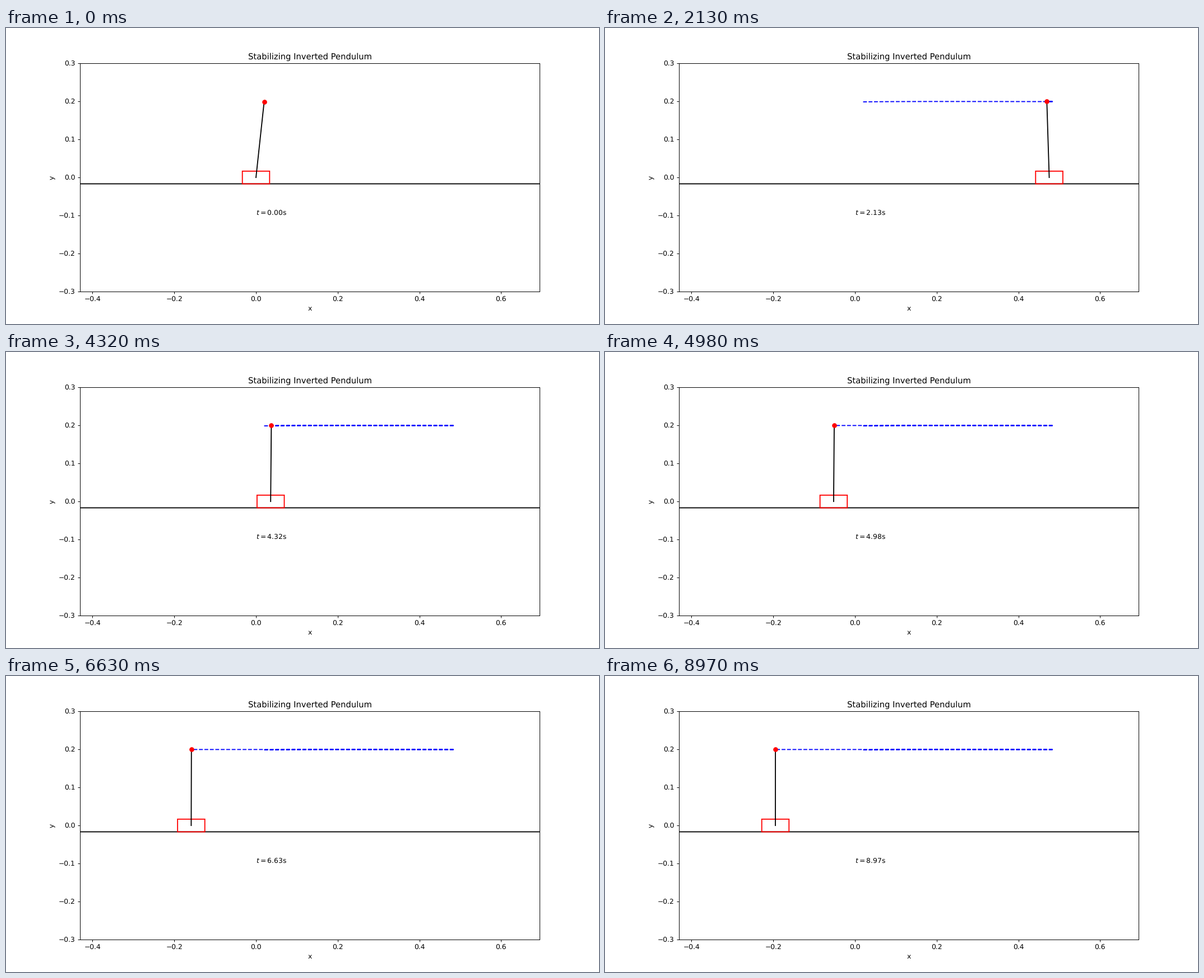
Animation, 1058 px wide and 529 px high, one loop 9 s. Source, as a matplotlib script:

```python
import math

import numpy as np
import matplotlib.pyplot as plt
from matplotlib.animation import FuncAnimation
from matplotlib.patches import Rectangle

G = 9.81
ROD = 0.2              # drawn rod length
ARM = 0.39             # effective length, inertia included
THETA0 = 0.1
GOAL = -0.203          # where the cart settles
GAINS = np.array([3.099, 9.551, 10.573, 5.33])
STEP = 0.03
FRAMES = 300
CART_W, CART_H = ROD / 3, ROD / 6


def simulate():
    """Cart position and rod angle at every step, starting from rest.

    The state is s - GOAL with s = x + ARM * theta, and its first three
    derivatives; s'' = G * theta, and feedback sets the fourth derivative.
    """
    flow = np.diag(np.ones(3), 1)
    flow[3] = -GAINS
    advance = sum(np.linalg.matrix_power(flow * STEP, n) / math.factorial(n)
                  for n in range(10))
    state = np.array([ARM * THETA0 - GOAL, 0, G * THETA0, 0])
    path = []
    for _ in range(FRAMES):
        path.append(state)
        state = advance @ state
    path = np.array(path)
    angle = path[:, 2] / G
    return path[:, 0] + GOAL - ARM * angle, angle


cart_x, theta = simulate()
bob_x = cart_x + ROD * np.sin(theta)
bob_y = ROD * np.cos(theta)

plt.rcParams["text.hinting"] = "none"
fig, ax = plt.subplots(figsize=(12, 6), dpi=1058 / 12)
ax.set(xlim=(-0.4304, 0.6944), ylim=(-0.3, 0.3), xlabel="x", ylabel="y",
       title="Stabilizing Inverted Pendulum")
ax.axhline(-CART_H / 2, color="k", lw=1.5, zorder=1, snap=False)

cart = Rectangle((0, -CART_H / 2), CART_W, CART_H, fill=False,
                 ec="r", lw=1.5, zorder=1.5, snap=False)
ax.add_patch(cart)
trail, = ax.plot([], [], "b--", lw=1.5)
rod, = ax.plot([], [], "k-", lw=1.5)
bob, = ax.plot([], [], "ro", ms=6)
clock = ax.text(0, -0.1, "")


def draw(i):
    cart.set_x(cart_x[i] - CART_W / 2)
    trail.set_data(bob_x[:i + 1], bob_y[:i + 1])
    rod.set_data([cart_x[i], bob_x[i]], [0, bob_y[i]])
    bob.set_data([bob_x[i]], [bob_y[i]])
    clock.set_text(f"$t = {i * STEP:.2f}$s")
    return cart, trail, rod, bob, clock


anim = FuncAnimation(fig, draw, frames=FRAMES, interval=30,
                     init_func=lambda: draw(0), repeat=True)
plt.show()
```
